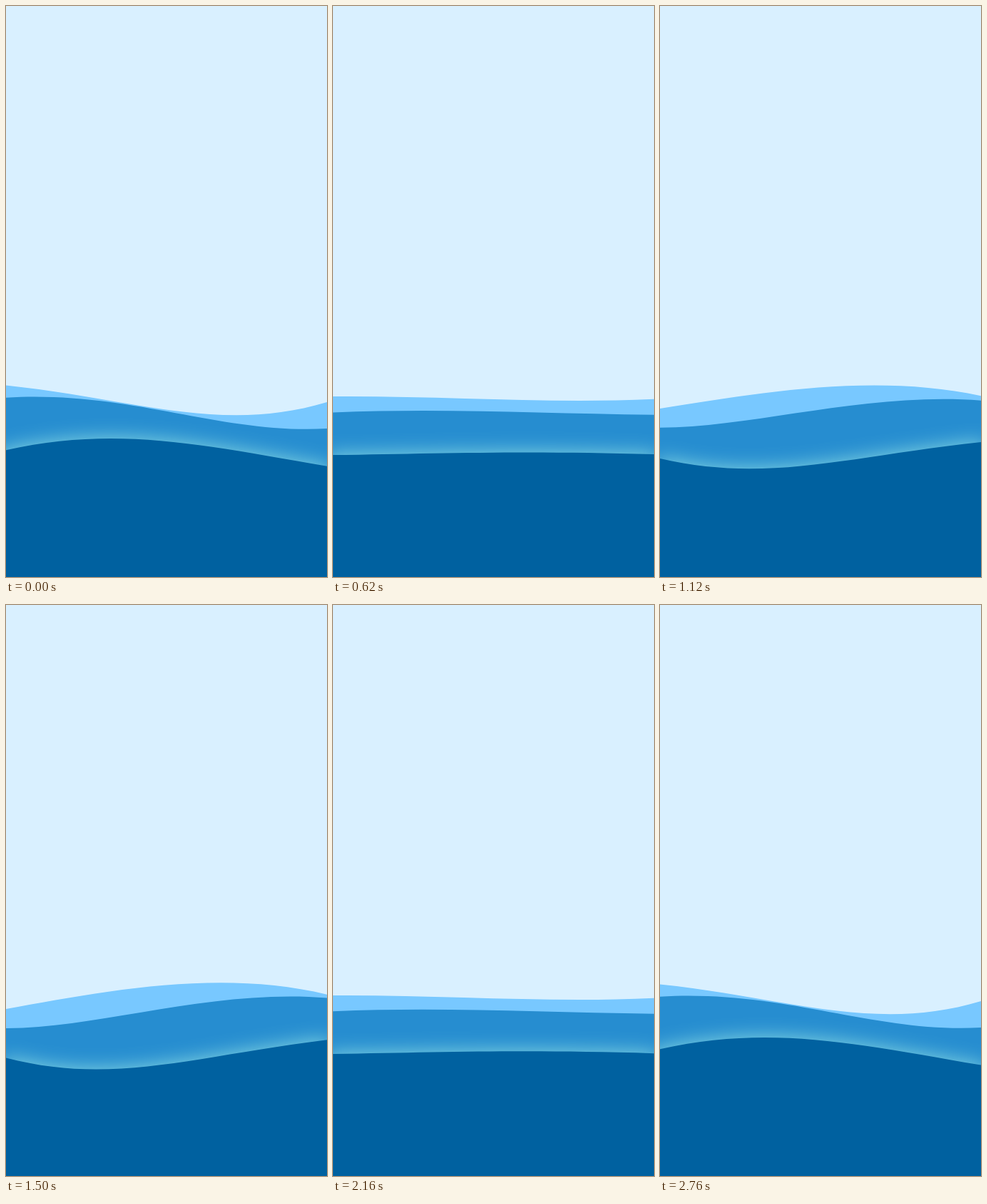
An HTML page with a canvas that plays this animation: 450x800 px, repeating every 2.8 s.

```html
<!DOCTYPE html>
<html lang="en">
<head>
<meta charset="utf-8">
<title>Waves</title>
<style>
  html, body { margin: 0; width: 100%; height: 100%; overflow: hidden; background: #d9f0ff; }
  canvas { display: block; }
</style>
</head>
<body>
<canvas id="stage" width="450" height="800"></canvas>
<script>
const ctx = document.getElementById('stage').getContext('2d');
const W = 450, H = 800, LOOP = 2800, TURN = 1390, RISE = 1300;
const LEFT = [-12, -2], RIGHT = W + 5;

// Each crest is one cubic curve: start height, two handles, end height.
const waves = [
  { color: '#78c8ff',
    from: [530.3, 175, 548, 300, 602, 553.5],
    to: [566.3, 130, 543, 300, 507.5, 547] },
  { color: '#268dd0',
    from: [549.5, 170, 535, 300, 602, 591.8],
    to: [593, 130, 594, 290, 536, 551] },
  { color: '#0061a0', glow: '#86d8e1',
    from: [625, 150, 586, 270, 614, 645.5],
    to: [634, 150, 674, 260, 632, 608.5] }
];

const mix = (a, b, p) => a + (b - a) * p;
const smooth = x => x * x * (3 - 2 * x);

function progress(t) {
  const u = Math.max(0, Math.min(t, 2 * TURN - t));
  return smooth(Math.min(1, u / RISE));
}

function drawWave({ color, glow, from, to }, p) {
  const [start, x1, y1, x2, y2, end] = from.map((v, i) => mix(v, to[i], p));
  const left = mix(...LEFT, p);
  ctx.beginPath();
  ctx.moveTo(left, start);
  ctx.bezierCurveTo(x1, y1, x2, y2, RIGHT, end);
  ctx.lineTo(RIGHT, H + 50);
  ctx.lineTo(left, H + 50);
  ctx.closePath();
  ctx.shadowColor = glow || 'transparent';
  ctx.shadowBlur = 28;
  ctx.fillStyle = color;
  ctx.fill();
}

function draw() {
  const p = progress(performance.now() % LOOP);
  ctx.shadowColor = 'transparent';
  ctx.fillStyle = '#d9f0ff';
  ctx.fillRect(0, 0, W, H);
  // The plain sea colour also fills the sliver left of a crest that starts just inside the stage.
  for (const wave of waves) drawWave(wave, p);
  requestAnimationFrame(draw);
}
draw();
</script>
</body>
</html>
```
